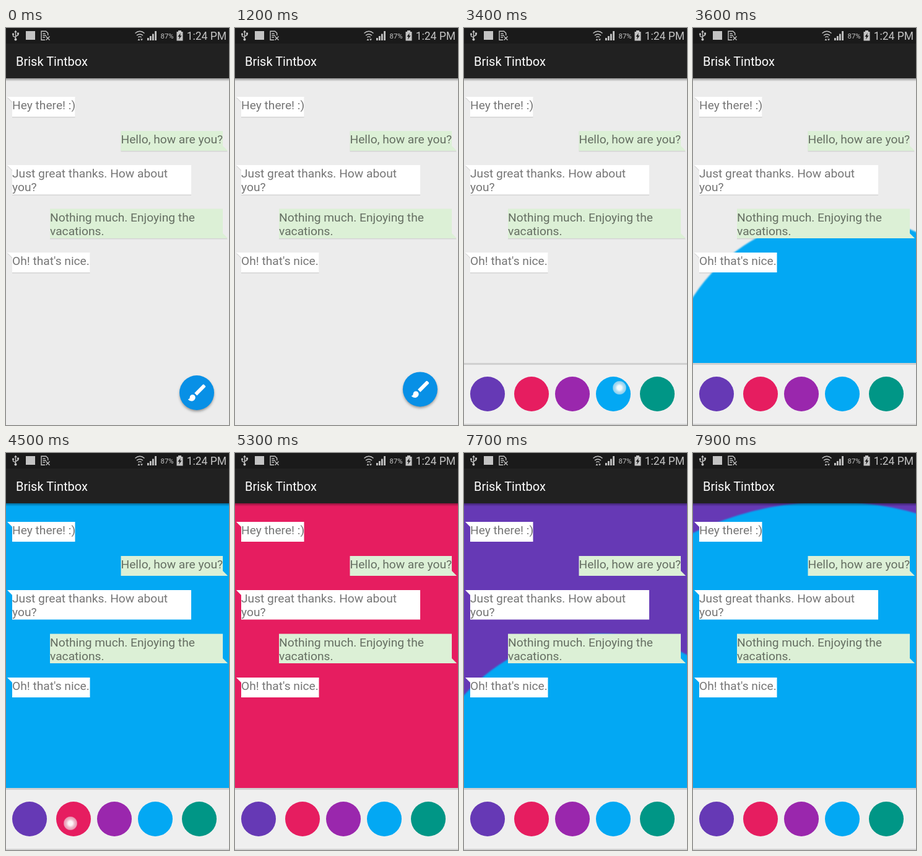
These frames come from a looping animation (360 by 640 pixels, 8 s). An HTML page:

```html
<!DOCTYPE html>
<html lang="en">
<head>
<meta charset="utf-8">
<title>Chat colours</title>
<style>
  html, body { margin: 0; width: 100%; height: 100%; overflow: hidden; background: #ececec; }
  svg { display: block; width: 360px; height: 640px; font-family: Roboto, sans-serif; }
  #chat { font-size: 19.2px; }
  #chat text { fill: #000; fill-opacity: .54; }
  #fills { filter: blur(.8px); }
  .status { fill: #c4c4c4; }
  .line { fill: none; stroke: #c4c4c4; stroke-width: 1.4; }
</style>
</head>
<body>
<svg viewBox="0 0 360 640">
  <defs>
    <clipPath id="page"><rect y="81" width="360" height="460"/></clipPath>
    <clipPath id="spread"><circle id="hole" cx="180" cy="590" r="0"/></clipPath>
    <linearGradient id="drop" x2="0" y2="1">
      <stop stop-opacity=".38"/><stop offset="1" stop-opacity="0"/>
    </linearGradient>
    <radialGradient id="glow">
      <stop offset=".3" stop-color="#fff" stop-opacity=".95"/>
      <stop offset=".62" stop-color="#f0f0f0" stop-opacity=".72"/>
      <stop offset=".88" stop-color="#eee" stop-opacity=".6"/>
      <stop offset="1" stop-color="#eee" stop-opacity="0"/>
    </radialGradient>
    <filter id="soft" x="-30%" y="-30%" width="160%" height="160%"><feGaussianBlur stdDeviation="2"/></filter>
  </defs>

  <rect width="360" height="640" fill="#ececec"/>
  <g id="shadows" fill="#000" fill-opacity=".1"></g>
  <g clip-path="url(#page)"><g id="fills"></g></g>
  <g id="chat"></g>

  <rect y="81" width="360" height="5" fill="url(#drop)"/>
  <rect width="360" height="25" fill="#1a1a1a"/>
  <rect y="25" width="360" height="56" fill="#212121"/>
  <text x="16" y="60.5" font-size="20" fill="#fff">Brisk Tintbox</text>

  <g id="statusIcons">
    <path class="line" d="M15.5 6V18M15.5 15.5L11.5 13V10M15.5 13.5L19.5 11.5V9"/>
    <path class="status" d="M15.5 3.5l2.3 3.6h-4.6zM18 7.5h3v3h-3z"/>
    <circle class="status" cx="15.5" cy="18.6" r="2"/><circle class="status" cx="11.5" cy="9.8" r="1.6"/>
    <rect class="status" x="32" y="5" width="15" height="14"/>
    <path class="line" d="M63 19.3H57V5.2h7.5l3.2 3.2V12M59.5 9h4M59.5 12h5.5M59.5 15h3.5"/>
    <path class="line" d="M64.5 13.5l6 6M70.5 13.5l-6 6"/>
    <path class="line" stroke-width="1.8" d="M208.5 8.5q7.5-6.5 15 0M211 12q5-4.2 10 0M213.3 15q2.7-2.2 5.4 0"/>
    <path class="status" d="M212.5 20l2-3 2 3zM217 17.5h4l-2 3z"/>
    <path class="status" d="M228 16h2.8v4H228zM232 13h2.8v7H232zM236 9.5h2.8V20H236zM240.2 5h2.8v15h-2.8z"/>
    <text class="status" x="249.5" y="17" font-size="11.4">87%</text>
    <path class="status" d="M278 4h5v2h2.5v14.5h-10V6h2.5z"/>
    <path fill="#1a1a1a" d="M281.8 8l-4.3 6h2.4l-.8 4.5 4.4-6.3h-2.5z"/>
    <text class="status" x="291.7" y="18.7" font-size="17.5">1:24 PM</text>
  </g>

  <g clip-path="url(#spread)">
    <rect y="540" width="360" height="100" fill="#efefef"/>
    <rect y="540" width="360" height="3" fill="#d0d0d0"/>
    <rect y="638" width="360" height="2" fill="#d4d4d4"/>
    <g id="swatches"></g>
  </g>

  <g id="fab">
    <circle cx="0" cy="2.5" r="27.5" fill-opacity=".4" filter="url(#soft)"/>
    <circle r="28" fill="#0890e6"/>
    <path fill="#fff" transform="translate(-17.3 -18) scale(1.5)" d="M7 14c-1.66 0-3 1.34-3 3 0 1.31-1.16 2-2 2 .92 1.22 2.49 2 4 2 2.21 0 4-1.79 4-4 0-1.66-1.34-3-3-3zm13.71-9.37l-1.34-1.34c-.39-.39-1.02-.39-1.41 0L9 12.25 11.75 15l8.96-8.96c.39-.39.39-1.02 0-1.41z"/>
  </g>
  <circle id="touch" r="11.5" fill="url(#glow)"/>
</svg>

<script>
const LOOP = 8000, TICK = 100;
const $ = id => document.getElementById(id);

function add(parent, tag, attrs, text) {
  const el = document.createElementNS("http://www.w3.org/2000/svg", tag);
  for (const key in attrs) el.setAttribute(key, attrs[key]);
  if (text) el.textContent = text;
  return parent.appendChild(el);
}

const purple = { x: 38, color: "#6639b5" };
const pink = { x: 109, color: "#e61d60" };
const violet = { x: 175, color: "#9a27ad" };
const blue = { x: 241, color: "#03a8f3" };
const teal = { x: 312, color: "#009686" };
for (const s of [purple, pink, violet, blue, teal])
  add($("swatches"), "circle", { cx: s.x, cy: 590, r: 28, fill: s.color });

const bubbles = [
  { x: 10, y: 111, w: 101.5, h: 32, lines: ["Hey there! :)"] },
  { x: 185.5, y: 166, w: 164.5, h: 32, mine: true, lines: ["Hello, how are you?"] },
  { x: 10, y: 221, w: 289, h: 47.5, lines: ["Just great thanks. How about", "you?"] },
  { x: 71, y: 291.5, w: 279, h: 47.5, mine: true, lines: ["Nothing much. Enjoying the", "vacations."] },
  { x: 10, y: 362, w: 125.5, h: 32, lines: ["Oh! that's nice."] }
];
for (const { x, y, w, h, mine, lines } of bubbles) {
  const d = mine
    ? `M${x} ${y}h${w}v${h - 8}l8 8H${x}z`
    : `M${x - 8} ${y}h${w + 8}v${h}h${-w}v${8 - h}z`;
  add($("shadows"), "path", { d, transform: "translate(0 1.6)" });
  add($("chat"), "path", { d, fill: mine ? "#dcf0d6" : "#fff" });
  lines.forEach((line, i) => add($("chat"), "text", { x, y: y + 20 + i * 22 }, line));
}

const reveals = [
  { at: 3450, x: blue.x, color: blue.color },
  { at: 4780, x: pink.x, color: pink.color },
  { at: 6535, x: purple.x, color: purple.color },
  { at: 7540, x: 222, color: blue.color }
];
for (const r of reveals) {
  r.full = Math.hypot(Math.max(r.x, 360 - r.x), 509);
  r.el = add($("fills"), "circle", { cx: r.x, cy: 590, fill: r.color });
}

const touches = [
  { from: 1100, to: 1200, x: 308, y: 590 },
  { from: 3400, to: 3500, x: 251, y: 580 },
  { from: 4500, to: 4800, x: 104, y: 597 },
  { from: 6500, to: 6600, x: 38, y: 592 },
  { from: 7600, to: 7700, x: 243, y: 588 }
];

const progress = (t, from, length) => Math.min(1, Math.max(0, (t - from) / length));
const easeOut = p => 1 - (1 - p) ** 2;
const show = (el, on) => el.setAttribute("visibility", on ? "visible" : "hidden");

function draw(t) {
  // The button swings to the middle, then the palette spreads from there.
  const swing = progress(t, 1120, 300) ** 2;
  const fabX = 308 - 128 * swing, fabY = 588 + 2 * swing - 26 * Math.sin(Math.PI * swing);
  $("fab").setAttribute("transform", `translate(${fabX} ${fabY})`);
  show($("fab"), t < 1420);
  const spread = progress(t, 1420, 280);
  $("hole").setAttribute("r", spread ? 28 + 162 * spread : 0);

  for (const r of reveals) {
    const p = progress(t, r.at, 500);
    r.el.setAttribute("r", p < 1 ? r.full * easeOut(p) : 700);
  }

  const touch = touches.find(s => t >= s.from && t < s.to);
  show($("touch"), touch);
  if (touch) $("touch").setAttribute("transform", `translate(${touch.x} ${touch.y})`);
}

// The screen refreshes ten times a second.
const start = performance.now();
function frame() {
  const t = (performance.now() - start) % LOOP;
  draw(Math.floor(t / TICK) * TICK);
  requestAnimationFrame(frame);
}
frame();
</script>
</body>
</html>
```
